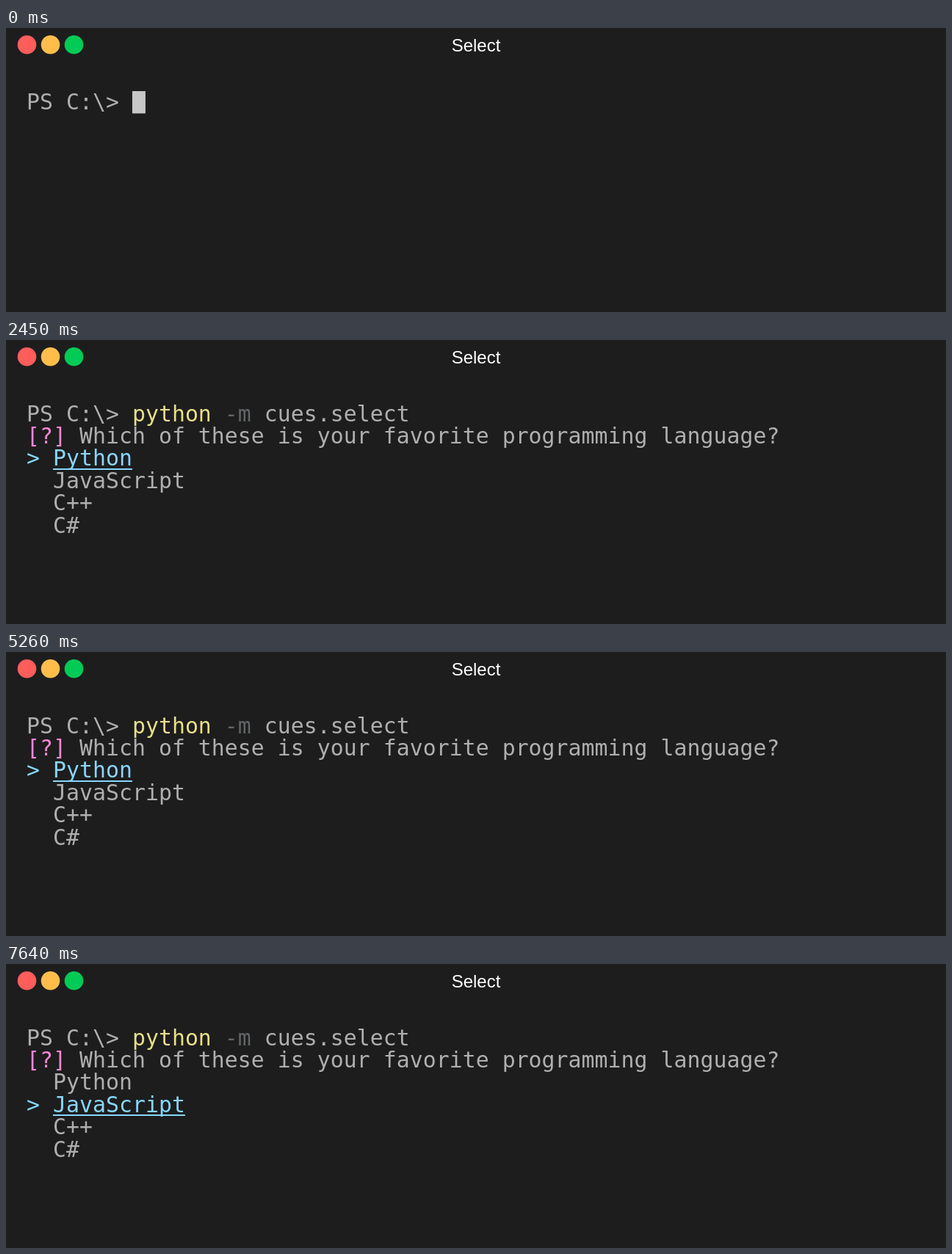
Write an HTML page with a canvas that moves like this. It is 1280 px wide and 387 px high and loops after 8 s.

```html
<!DOCTYPE html>
<html lang="en">
<head>
<meta charset="utf-8">
<title>Select</title>
<style>
html, body { margin: 0; width: 100%; height: 100%; overflow: hidden; background: #1d1d1d; }
canvas { display: block; width: 1280px; height: 387px; }
</style>
</head>
<body>
<canvas id="stage" width="1280" height="387"></canvas>
<script>
const ctx = document.getElementById('stage').getContext('2d');
const LOOP = 8000;
const LEFT = 28, TOP = 86, CELL = 17.99, ROW = 30.4;
const GREY = '#afafaf', YELLOW = '#ebdf86', DIM = '#626566';
const PINK = '#ff87d7', BLUE = '#87d7ff', CURSOR = '#c7c7c7';
const OPTIONS = ['Python', 'JavaScript', 'C++', 'C#'];

// Each step: start time and what the terminal shows from then on.
const steps = [
  { at: 0, cursor: [8, 0] },
  { at: 1460, typed: true },
  { at: 1480, typed: true, cursor: [29, 0] },
  { at: 2330, typed: true, cursor: [0, 1] },
  { at: 2430, typed: true, asked: true },
  { at: 2450, pick: 0, shown: 4 }
];

// A key press clears the last row for a moment, then redraws the list.
let picked = 0;
for (const [at, next] of [[3560, 1], [4040, 2], [4380, 3], [5160, 0], [6140, 3], [7220, 2], [7540, 1]]) {
  steps.push({ at, pick: picked, shown: 3 }, { at: at + 100, pick: next, shown: 4 });
  picked = next;
}

function write(text, col, row, color) {
  ctx.fillStyle = color;
  [...text].forEach((ch, i) =>
    ctx.fillText(ch, LEFT + (col + i) * CELL, TOP + row * ROW + 24.6));
}

function drawWindow() {
  ctx.fillStyle = '#1d1d1d';
  ctx.fillRect(0, 0, 1280, 387);
  ['#ff5c5c', '#ffbd4c', '#00ca56'].forEach((color, i) => {
    ctx.fillStyle = color;
    ctx.beginPath();
    ctx.arc(28.5 + 32 * i, 22.7, 12.8, 0, Math.PI * 2);
    ctx.fill();
  });
  ctx.fillStyle = '#fff';
  ctx.font = '24px "Liberation Sans", Arial, sans-serif';
  ctx.textAlign = 'center';
  ctx.fillText('Select', 640, 31.5);
}

function drawOption(name, i, active) {
  const row = i + 2;
  write(name, 2, row, active ? BLUE : GREY);
  if (!active) return;
  write('>', 0, row, BLUE);
  ctx.fillRect(LEFT + 2 * CELL, Math.round(TOP + row * ROW + 28), name.length * CELL, 2);
}

function draw(time) {
  const s = steps.filter(step => step.at <= time).pop();
  const listed = s.shown > 0;
  drawWindow();
  ctx.textAlign = 'left';
  ctx.font = '29.8px "DejaVu Sans Mono", monospace';
  write('PS C:\\>', 0, 0, GREY);
  if (s.typed || listed) {
    write('python', 8, 0, YELLOW);
    write('-m', 15, 0, DIM);
    write('cues.select', 18, 0, GREY);
  }
  if (s.asked || listed) {
    write('[?]', 0, 1, PINK);
    write('Which of these is your favorite programming language?', 4, 1, GREY);
  }
  if (listed) {
    OPTIONS.slice(0, s.shown).forEach((name, i) => drawOption(name, i, i === s.pick));
  }
  if (s.cursor) {
    const [col, row] = s.cursor;
    ctx.fillStyle = CURSOR;
    ctx.fillRect(LEFT + col * CELL, TOP + row * ROW, CELL, ROW);
  }
}

const start = performance.now();
function tick() {
  draw((performance.now() - start) % LOOP);
  requestAnimationFrame(tick);
}
tick();
</script>
</body>
</html>
```
